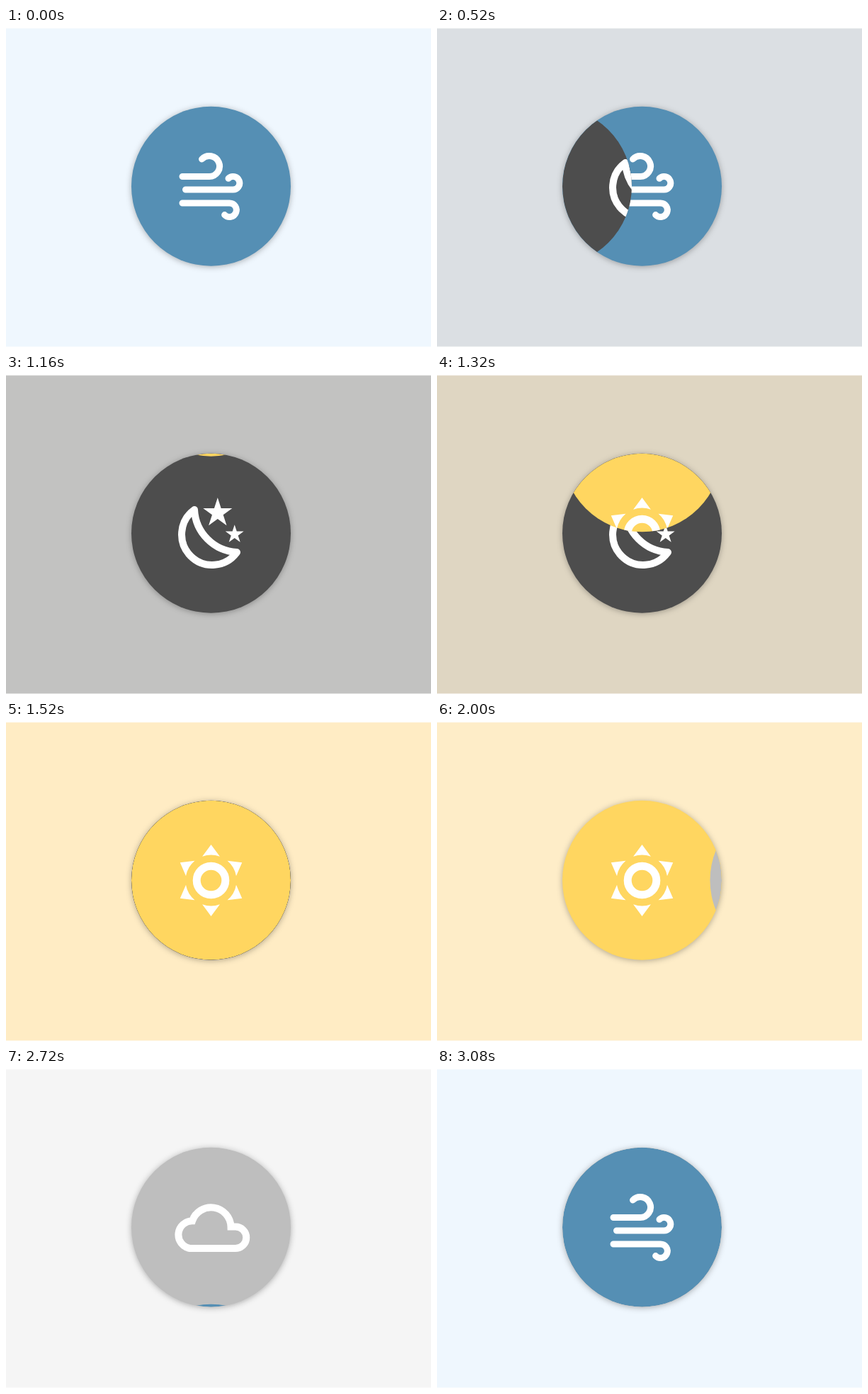
Write an HTML page that moves like this. It is 600 by 450 pixels and loops after 3440 ms.

```html
<!DOCTYPE html>
<html lang="en">
<head>
<meta charset="utf-8">
<title>Weather switch</title>
<style>
  html, body { margin: 0; width: 100%; height: 100%; overflow: hidden; }
  svg { display: block; width: 100vw; height: 100vh; }
  .line { fill: none; stroke: #fff; }
  .solid { fill: #fff; }
</style>
</head>
<body>
<svg viewBox="0 0 600 450">
  <defs>
    <filter id="soft" x="-20%" y="-20%" width="140%" height="140%">
      <feGaussianBlur stdDeviation="4"/>
    </filter>
    <clipPath id="disc"><circle cx="289.5" cy="223.25" r="112.5"/></clipPath>
    <clipPath id="wipe"><circle id="mover" cx="289.5" cy="223.25" r="112.5"/></clipPath>

    <g id="wind" class="line" stroke-width="9" stroke-linecap="round">
      <path d="M249 209.5H286.5A14.5 14.5 0 1 0 276.5 185"/>
      <path d="M253.5 228H320.5A9.25 9.25 0 1 0 314 212.2"/>
      <path d="M249 247H315.5A9.75 9.75 0 1 1 308.6 263.6"/>
    </g>
    <g id="moon">
      <path class="line" stroke-width="10" stroke-linejoin="round"
        d="M266 190A43 43 0 1 0 326 250A63.3 63.3 0 0 1 266 190Z"/>
      <path id="stars" class="solid"/>
    </g>
    <g id="sun">
      <circle class="line" cx="289.5" cy="223.5" r="20.3" stroke-width="11"/>
      <g id="rays" class="solid"></g>
    </g>
    <path id="cloud" class="line" stroke-width="10"
      d="M259.5 253A19.5 19.5 0 0 1 263 214.3A28 28 0 0 1 317.5 222.5H324A15.25 15.25 0 0 1 324 253Z"/>
  </defs>

  <rect id="sky" width="600" height="450"/>
  <path d="M0 .5H600M0 449.5H600" stroke="#fff" stroke-opacity=".6"/>
  <circle cx="289.5" cy="224.5" r="112.5" fill-opacity=".3" filter="url(#soft)"/>
  <circle id="base" cx="289.5" cy="223.25" r="112.5"/>
  <g clip-path="url(#disc)">
    <use id="baseIcon"/>
    <g id="next" clip-path="url(#wipe)">
      <circle id="cover" cx="289.5" cy="223.25" r="112.5"/>
      <use id="coverIcon"/>
    </g>
  </g>
</svg>
<script>
const $ = id => document.getElementById(id);
const LOOP = 3440, STEP = 40, SLIDE = 400, LEAD = 35;
const CX = 289.5, CY = 223.25, SIZE = 225;

// start: when the scene slides in; from: the side it enters on
const scenes = [
  { icon: 'wind',  disc: '#558fb4', sky: [239, 247, 254], start: 2682, from: [0, 1] },
  { icon: 'moon',  disc: '#4d4d4d', sky: [193, 193, 193], start: 335,  from: [-1, 0] },
  { icon: 'sun',   disc: '#ffd660', sky: [255, 236, 196], start: 1122, from: [0, -1] },
  { icon: 'cloud', disc: '#bebebe', sky: [245, 245, 245], start: 1924, from: [1, 0] }
];
const order = [1, 2, 3, 0];

function star(x, y, r) {
  const points = Array.from({ length: 10 }, (_, i) => {
    const a = i * Math.PI / 5, d = i % 2 ? r * 0.382 : r;
    return `${(x + d * Math.sin(a)).toFixed(2)} ${(y - d * Math.cos(a)).toFixed(2)}`;
  });
  return `M${points.join('L')}Z`;
}
$('stars').setAttribute('d', star(298.8, 194.7, 21.6) + star(322.7, 224.8, 13.6));

for (let i = 0; i < 6; i++) {
  const ray = document.createElementNS('http://www.w3.org/2000/svg', 'path');
  ray.setAttribute('d', 'M0 -50.5L12.4 -33.8A36 36 0 0 0 -12.4 -33.8Z');
  ray.setAttribute('transform', `translate(289.5 223.5) rotate(${i * 60})`);
  $('rays').append(ray);
}

// cubic-bezier(.42, 0, .58, 1)
function easeInOut(x) {
  if (x <= 0) return 0;
  if (x >= 1) return 1;
  let lo = 0, hi = 1, u;
  for (let i = 0; i < 20; i++) {
    u = (lo + hi) / 2;
    const v = 1 - u;
    if (1.26 * u * v * v + 1.74 * u * u * v + u ** 3 < x) lo = u; else hi = u;
  }
  return u * u * (3 - 2 * u);
}

function paint(disc, icon, scene) {
  $(disc).setAttribute('fill', scene.disc);
  $(icon).setAttribute('href', '#' + scene.icon);
}

function render(time) {
  const t = Math.floor((time % LOOP) / STEP) * STEP;
  let old = scenes[0], cur = scenes[0], p = 1;
  for (const i of order) {
    const age = t - scenes[i].start;
    if (age < LEAD) break;
    old = cur;
    cur = scenes[i];
    p = easeInOut(age / SLIDE);
  }
  const away = SIZE * (1 - p);
  paint('base', 'baseIcon', p < 1 ? old : cur);
  paint('cover', 'coverIcon', cur);
  $('next').setAttribute('display', p < 1 ? 'inline' : 'none');
  $('mover').setAttribute('cx', CX + cur.from[0] * away);
  $('mover').setAttribute('cy', CY + cur.from[1] * away);
  const sky = old.sky.map((c, i) => Math.round(c + (cur.sky[i] - c) * p));
  $('sky').setAttribute('fill', `rgb(${sky})`);
}

const began = performance.now();
function tick() {
  render(performance.now() - began);
  requestAnimationFrame(tick);
}
tick();
</script>
</body>
</html>
```
